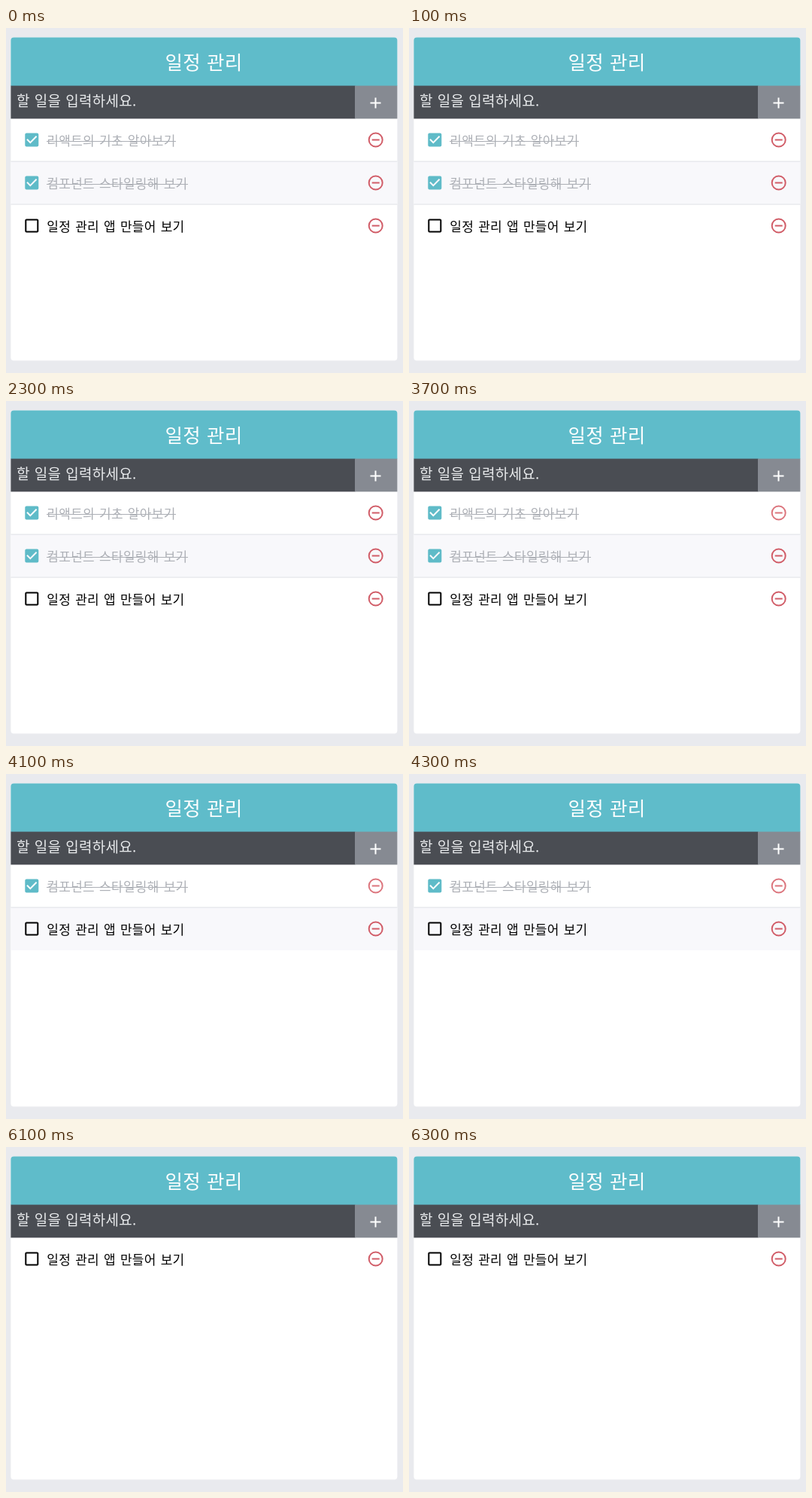
Animation, 528 px wide and 458 px high, one loop 7.2 s. Source, as an HTML page:

```html
<!DOCTYPE html>
<html lang="ko">
<head>
<meta charset="utf-8">
<title>일정 관리</title>
<style>
  html, body { margin: 0; width: 100%; height: 100%; overflow: hidden; background: #e9eaee; }
  svg { display: block; width: 528px; height: 458px; }
  text {
    font-family: "Noto Sans CJK KR", "Noto Sans CJK JP", "Noto Sans CJK", sans-serif;
    font-size: 17px; letter-spacing: .3px; word-spacing: .9px;
  }
  .title { font-size: 25.5px; word-spacing: .6px; fill: #fff; text-anchor: middle; }
  .hint { font-size: 19px; word-spacing: .3px; fill: #e8eaec; }
  .done text, .strike { fill: #adb0b6; }
  .tick { fill: #5fbbc8; }
  .line { fill: #dfe1e7; }
  .stripe { fill: #f8f8fb; }
  .remove { fill: none; stroke: #d15d68; stroke-width: 2; }

  /* 3600 hover, 4100 first removal, 5000 second removal, 6100 hover ends */
  .first, .slot3 { animation: gone1 7.2s step-end infinite; }
  .second, .slot2 { animation: gone2 7.2s step-end infinite; }
  .second .shift { animation: up1 7.2s step-end infinite; }
  .third { animation: up2 7.2s step-end infinite; }
  .hover { animation: hover 7.2s step-end infinite; }
  @keyframes gone1 { 0% { visibility: visible } 56.944%, 100% { visibility: hidden } }
  @keyframes gone2 { 0% { visibility: visible } 69.444%, 100% { visibility: hidden } }
  @keyframes up1 { 0% { transform: none } 56.944%, 100% { transform: translateY(-57px) } }
  @keyframes up2 {
    0% { transform: none }
    56.944% { transform: translateY(-57px) }
    69.444%, 100% { transform: translateY(-114px) }
  }
  @keyframes hover { 0% { stroke: #d15d68 } 50% { stroke: #dc757d } 84.722%, 100% { stroke: #d15d68 } }
</style>
</head>
<body>
<svg viewBox="0 0 528 458">
  <defs>
    <path id="checked" d="M19 3H5c-1.11 0-2 .9-2 2v14c0 1.1.89 2 2 2h14c1.11 0 2-.9 2-2V5c0-1.1-.89-2-2-2zm-9 14l-5-5 1.41-1.41L10 14.17l7.59-7.59L19 8l-9 9z"/>
    <path id="remove" d="M500.7 148.5a9 9 0 1 1-18 0a9 9 0 1 1 18 0M486.7 148.5h10"/>
  </defs>

  <rect x="6.4" y="12.6" width="514" height="429" rx="4" fill="#fff"/>
  <path d="M6.4 77V16.6a4 4 0 0 1 4-4H516.4a4 4 0 0 1 4 4V77z" fill="#5fbcca"/>
  <rect x="6.4" y="76.6" width="458" height="43.8" fill="#4a4d53"/>
  <rect x="464" y="76.6" width="56.4" height="43.8" fill="#868a92"/>
  <text class="title" x="263" y="54.5">일정 관리</text>
  <text class="hint" x="14" y="104">할 일을 입력하세요.</text>
  <path d="M484.5 99.5h14M491.5 92.5v14" stroke="#fff" stroke-width="2"/>

  <use href="#remove" class="remove hover"/>
  <g class="slot2">
    <rect class="stripe" x="6.4" y="177" width="514" height="57"/>
    <rect class="line" x="6.4" y="176.6" width="514" height="1"/>
    <use href="#remove" class="remove" y="57"/>
  </g>
  <g class="slot3">
    <rect class="line" x="6.4" y="233.6" width="514" height="1"/>
    <use href="#remove" class="remove" y="114"/>
  </g>

  <g class="first done">
    <use href="#checked" class="tick" x="22.3" y="136.5"/>
    <text x="54.3" y="156">리액트의 기초 알아보기</text>
    <rect class="strike" x="54" y="150" width="172" height="1"/>
  </g>
  <g class="second done"><g class="shift">
    <use href="#checked" class="tick" x="22.3" y="193.5"/>
    <text x="54.3" y="213">컴포넌트 스타일링해 보기</text>
    <rect class="strike" x="54" y="207" width="188" height="1"/>
  </g></g>
  <g class="third">
    <rect x="26.3" y="254.5" width="16" height="16" rx="1" fill="none" stroke="#000" stroke-width="2"/>
    <text x="54.3" y="270">일정 관리 앱 만들어 보기</text>
  </g>
</svg>
</body>
</html>
```
